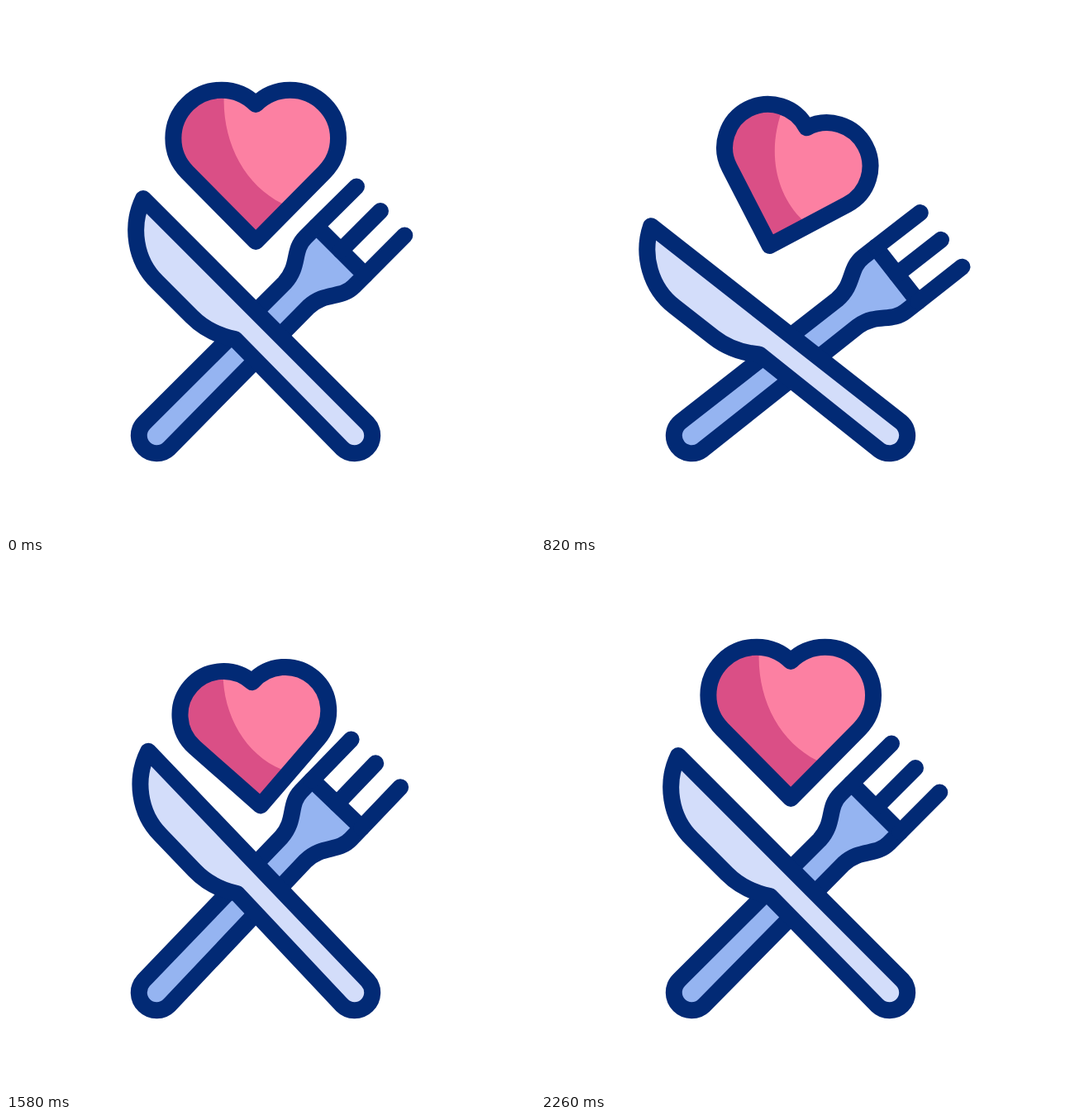
An HTML page for the animation above (2.4 s loop, 640 by 640 pixels).

```html
<!DOCTYPE html>
<html lang="en">
<head>
<meta charset="utf-8">
<title>Heart with knife and fork</title>
<style>
  html, body { margin: 0; width: 100%; height: 100%; overflow: hidden; background: #fff; }
  svg { display: block; width: 100%; height: 100%; }
  .line { stroke: #022a75; stroke-width: 20; stroke-linecap: round; stroke-linejoin: round; }
</style>
</head>
<body>
<svg viewBox="0 0 640 640">
  <defs>
    <path id="heartShape" d="M0 95L-83 11A58 58 0 0 1 0 -71A58 58 0 0 1 83 11Z"/>
    <clipPath id="heartClip"><use href="#heartShape"/></clipPath>
  </defs>

  <g id="fork" class="line">
    <path fill="#95b4f1" d="M375.5 266.5L362 280C346 296 356 314 337 335L166.8 504.8
      A21.5 21.5 0 0 0 197.2 535.2L366 364C387 345 405 355 421 339L434.5 325.5Z"/>
    <path fill="none" d="M424 218.5L375.5 266.5M453 248L405 296M482.3 277.5L434.5 325.5"/>
  </g>

  <path id="knife" class="line" fill="#d3ddfa" d="M166 233C150 266 156 308 183 334L225 376
    C240 391 257 399 277 403L406.8 535.2A21.5 21.5 0 0 0 437.2 504.8Z"/>

  <g id="heart">
    <use href="#heartShape" fill="#fc80a2"/>
    <path clip-path="url(#heartClip)" fill="#da4f86"
      d="M-38 -90C-43 -30 -16 25 32 49L46 56L0 114L-110 4V-90Z"/>
    <use id="heartLine" class="line" href="#heartShape" fill="none"/>
  </g>
</svg>
<script>
  const LOOP = 2400, STEP = 20, LINE = 20;
  const [fork, knife, heart, heartLine] =
    ["fork", "knife", "heart", "heartLine"].map(id => document.getElementById(id));

  // Each key is [time in ms, value].
  const spread = [[200, 0], [800, 7], [1385, -4.65], [1830, 3.8], [2260, 0]];
  const tilt = [[200, 0], [800, 17.5], [1385, -13.2], [1830, 9.6], [2260, 0]];
  // The heart crouches, leaps, crouches again and comes to rest.
  const hop = (rest, crouch, leap) => [
    [200, rest], [620, crouch], [810, crouch], [1240, leap],
    [1600, crouch], [1840, crouch], [2260, rest]
  ];
  const height = hop(190, 208.4, 165.8);
  const size = hop(1, 0.9, 1.05);

  const ease = u => u * u * (3 - 2 * u);

  function valueAt(keys, t) {
    if (t <= keys[0][0]) return keys[0][1];
    for (let i = 1; i < keys.length; i++) {
      const [t0, a] = keys[i - 1], [t1, b] = keys[i];
      if (t <= t1) return a + (b - a) * ease((t - t0) / (t1 - t0));
    }
    return keys[keys.length - 1][1];
  }

  function draw(t) {
    const angle = valueAt(spread, t), scale = valueAt(size, t);
    fork.setAttribute("transform", `rotate(${angle} 182 520)`);
    knife.setAttribute("transform", `rotate(${-angle} 422 520)`);
    heart.setAttribute("transform",
      `translate(302.2 ${valueAt(height, t)}) rotate(${valueAt(tilt, t)}) scale(${scale})`);
    // The outline keeps its weight while the heart scales.
    heartLine.style.strokeWidth = LINE / scale;
  }

  const start = performance.now();
  function tick() {
    const t = (performance.now() - start + 2) % LOOP;
    draw(Math.floor(t / STEP) * STEP);
    requestAnimationFrame(tick);
  }
  tick();
</script>
</body>
</html>
```
